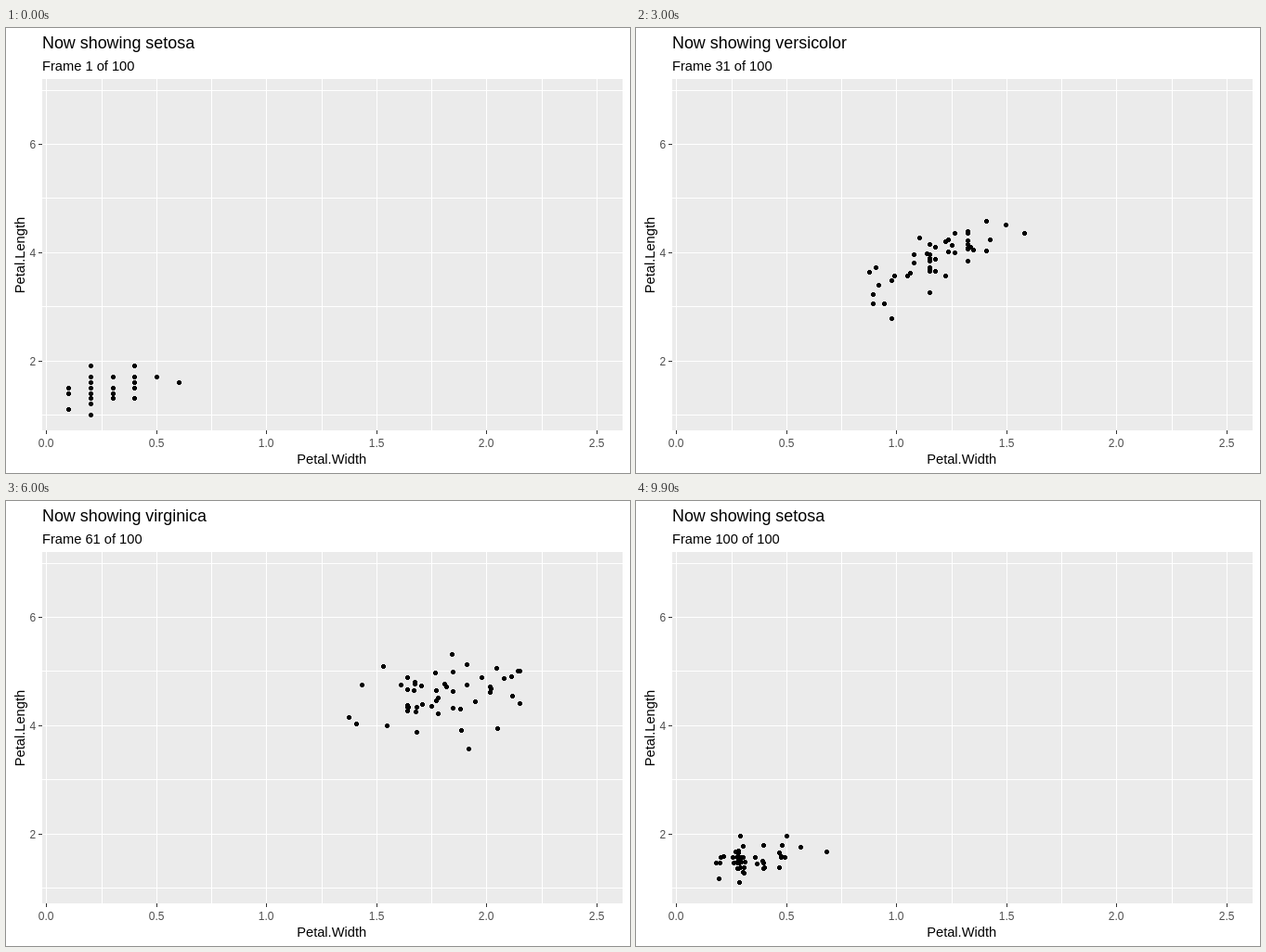
These frames come from a looping animation (672x480 px, 10 s). An HTML page:

```html
<!DOCTYPE html>
<html lang="en">
<head>
<meta charset="utf-8">
<title>Petal scatter</title>
<style>
  html, body { margin: 0; width: 100%; height: 100%; overflow: hidden; background: #fff; }
  svg { display: block; font-family: "Liberation Sans", Arial, sans-serif; font-size: 14.67px; }
  .tick { font-size: 12px; fill: #4d4d4d; }
</style>
</head>
<body>
<svg id="chart" width="672" height="480" viewBox="0 0 672 480">
  <rect width="672" height="480" fill="#fff"/>
  <rect x="39" y="55" width="625" height="379" fill="#ebebeb"/>
  <g id="axes" shape-rendering="crispEdges"></g>
  <path id="dots" shape-rendering="crispEdges"/>
  <text id="title" x="39" y="22" font-size="17.9"></text>
  <text id="subtitle" x="39" y="46"></text>
  <text x="350.7" y="470" text-anchor="middle">Petal.Width</text>
  <text transform="translate(20 245) rotate(-90)" text-anchor="middle">Petal.Length</text>
</svg>
<script>
const FRAME_MS = 100, FRAMES = 100;

// Row i of each species travels to row i of the next one.
const species = [
  {
    name: "setosa",
    width: [.2,.2,.2,.2,.2,.4,.3,.2,.2,.1,.2,.2,.1,.1,.2,.4,.4,.3,.3,.3,.2,.4,.2,.5,.2,
            .2,.4,.2,.2,.2,.2,.4,.1,.2,.2,.2,.2,.1,.2,.2,.3,.3,.2,.6,.4,.3,.2,.2,.2,.2],
    length: [1.4,1.4,1.3,1.5,1.4,1.7,1.4,1.5,1.4,1.5,1.5,1.6,1.4,1.1,1.2,1.5,1.3,1.4,1.7,1.5,1.7,1.5,1,1.7,1.9,
             1.6,1.6,1.5,1.4,1.6,1.6,1.5,1.5,1.4,1.5,1.2,1.3,1.4,1.3,1.5,1.3,1.3,1.3,1.6,1.9,1.4,1.6,1.4,1.5,1.4]
  },
  {
    name: "versicolor",
    width: [1.4,1.5,1.5,1.3,1.5,1.3,1.6,1,1.3,1.4,1,1.5,1,1.4,1.3,1.4,1.5,1,1.5,1.1,1.8,1.3,1.5,1.2,1.3,
            1.4,1.4,1.7,1.5,1,1.1,1,1.2,1.6,1.5,1.6,1.5,1.3,1.3,1.3,1.2,1.4,1.2,1,1.3,1.2,1.3,1.3,1.1,1.3],
    length: [4.7,4.5,4.9,4,4.6,4.5,4.7,3.3,4.6,3.9,3.5,4.2,4,4.7,3.6,4.4,4.5,4.1,4.5,3.9,4.8,4,4.9,4.7,4.3,
             4.4,4.8,5,4.5,3.5,3.8,3.7,3.9,5.1,4.5,4.5,4.7,4.4,4.1,4,4.4,4.6,4,3.3,4.2,4.2,4.2,4.3,3,4.1]
  },
  {
    name: "virginica",
    width: [2.5,1.9,2.1,1.8,2.2,2.1,1.7,1.8,1.8,2.5,2,1.9,2.1,2,2.4,2.3,1.8,2.2,2.3,1.5,2.3,2,2,1.8,2.1,
            1.8,1.8,1.8,2.1,1.6,1.9,2,2.2,1.5,1.4,2.3,2.4,1.8,1.8,2.1,2.4,2.3,1.9,2.3,2.5,2.3,1.9,2,2.3,1.8],
    length: [6,5.1,5.9,5.6,5.8,6.6,4.5,6.3,5.8,6.1,5.1,5.3,5.5,5,5.1,5.3,5.5,6.7,6.9,5,5.7,4.9,6.7,4.9,5.7,
             6,4.8,4.9,5.6,5.8,6.1,6.4,5.6,5.1,5.6,6.1,5.6,5.5,4.8,5.4,5.6,5.1,5.1,5.9,5.7,5.2,5,5.2,5.4,5.1]
  }
];

// Frames at which each species leaves and the next one has arrived.
const moves = [[12, 34], [46, 68], [80, 101]];

const byId = id => document.getElementById(id);
const lerp = (a, b, k) => a + (b - a) * k;
const px = v => Math.floor(39.2 + (v + 0.02) * 236.93 + 1e-6);
const py = v => Math.floor(417.5 - (v - 1) * 58.4 + 1e-6);

function bounceOut(p) {
  if (p < 4 / 11) return 121 * p * p / 16;
  if (p < 8 / 11) return 9.075 * p * p - 9.9 * p + 3.4;
  if (p < 0.9) return (4356 / 361) * p * p - (35442 / 1805) * p + 16061 / 1805;
  return 10.8 * p * p - 20.52 * p + 10.72;
}
const bounceIn = p => 1 - bounceOut(1 - p);

function drawAxes() {
  let out = "";
  const rect = (x, y, w, h, fill) => out += `<rect x="${x}" y="${y}" width="${w}" height="${h}" fill="${fill}"/>`;
  const label = (x, y, anchor, text) =>
    out += `<text class="tick" x="${x}" y="${y}" text-anchor="${anchor}">${text}</text>`;

  for (let i = 0; i <= 10; i++) {
    const x = px(i / 4);
    rect(x, 55, 1, 379, "#fff");
    if (i % 2) continue;
    rect(x, 434, 1, 4, "#333");
    label(x + 0.2, 452, "middle", (i / 4).toFixed(1));
  }
  for (let v = 1; v <= 7; v++) {
    const y = py(v);
    rect(39, y, 625, 1, "#fff");
    if (v % 2) continue;
    rect(35, y, 4, 1, "#333");
    label(32.3, y + 5, "end", v);
  }
  byId("axes").innerHTML = out;
}

function poseAt(frame) {
  let i = moves.findIndex(([, end]) => frame < end);
  if (i < 0) i = moves.length - 1;
  const [start, end] = moves[i];
  const p = Math.max(0, (frame - start) / (end - start));
  return { from: species[i], to: species[(i + 1) % 3], p };
}

function render(frame) {
  const { from, to, p } = poseAt(frame);
  const rise = bounceIn(p);
  byId("title").textContent = "Now showing " + (p > 0.5 ? to : from).name;
  byId("subtitle").textContent = `Frame ${frame} of ${FRAMES}`;
  byId("dots").setAttribute("d", from.width.map((w, i) => {
    const x = px(lerp(w, to.width[i], p));
    const y = py(lerp(from.length[i], to.length[i], rise));
    return `M${x - 1} ${y - 2}h3v1h1v3h-1v1h-3v-1h-1v-3h1z`;
  }).join(""));
}

const origin = performance.now();
let shown = 0;
function tick() {
  const frame = Math.floor((performance.now() - origin) / FRAME_MS) % FRAMES + 1;
  if (frame !== shown) render(shown = frame);
  requestAnimationFrame(tick);
}

drawAxes();
tick();
</script>
</body>
</html>
```
